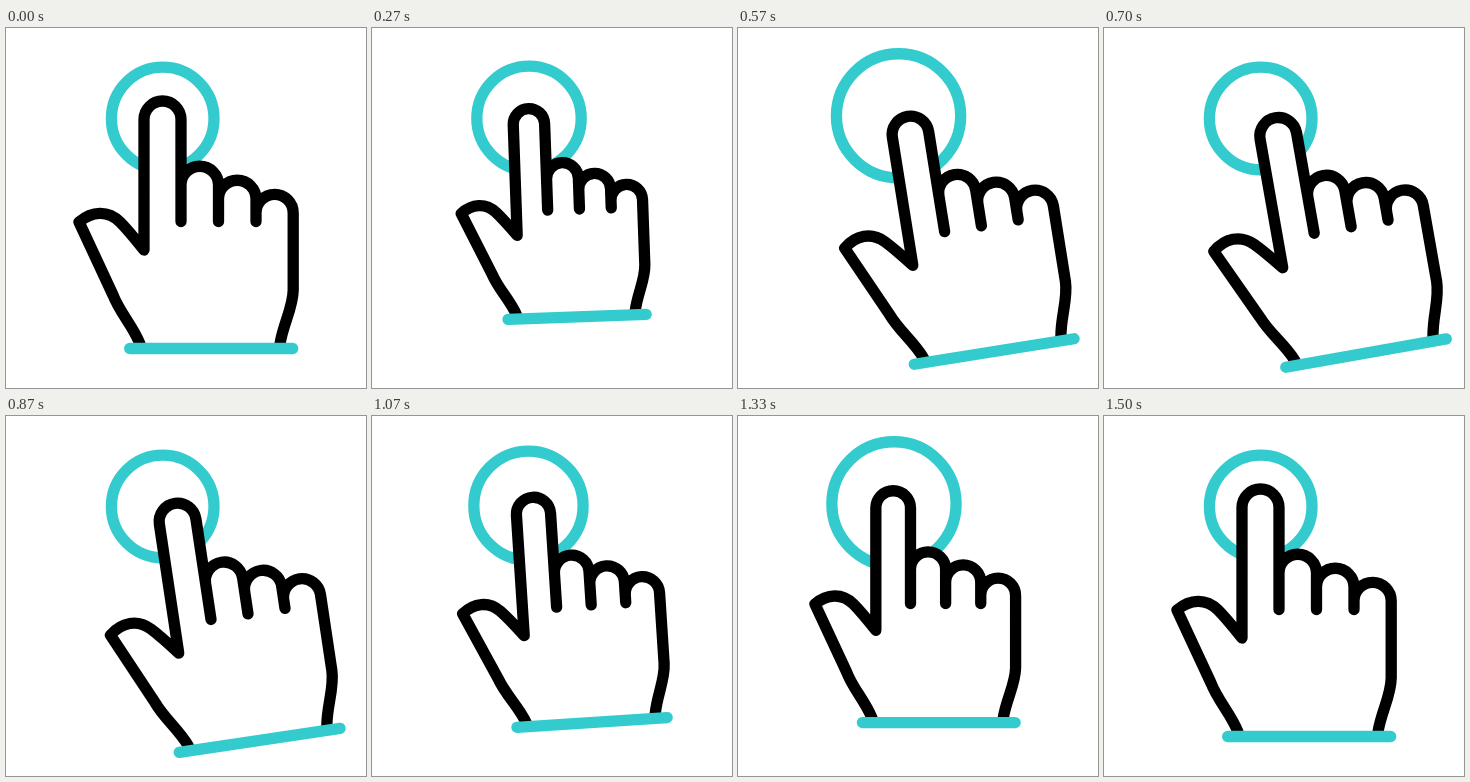
These frames come from a looping animation (360 px wide and 360 px high, 1.67 s). An HTML page:

```html
<!DOCTYPE html>
<html lang="en">
<head>
<meta charset="utf-8">
<title>Double tap</title>
<style>
  html, body { margin: 0; width: 100%; height: 100%; overflow: hidden; background: #fff; }
  svg { display: block; width: 100vw; height: 100vh; }
  path, circle { stroke-width: 11.3; stroke-linecap: round; stroke-linejoin: round; vector-effect: non-scaling-stroke; }
  .accent { fill: none; stroke: #33cbcd; }
  .skin { fill: #fff; stroke: #000; }
</style>
</head>
<body>
<svg viewBox="0 0 360 360">
  <circle id="ring" class="accent" cx="156.7" cy="90.5" r="51.3"/>
  <!-- the fingertip is the hand's local anchor -->
  <g id="hand">
    <g transform="translate(-156.5 -91.5)">
      <path class="skin" d="M134 316C127 298 114 285 107 267L73 194C86 183 102 182 114 194C122 202 130 212 138 222
        V91.5a18.5 18.5 0 0 1 37 0V157a18.75 18.75 0 0 1 37.5 0V171a18.75 18.75 0 0 1 37.5 0
        V185a18.6 18.6 0 0 1 37.2 0V262C287 280 277 296 274 316
        M175 157V193.5M212.5 171V193.5M250 185V193.5"/>
      <path class="accent" d="M123.7 320.5H286.7"/>
    </g>
  </g>
</svg>
<script>
  const LOOP = 1670, FPS = 30;
  const ring = document.getElementById('ring');
  const hand = document.getElementById('hand');

  const ease = (a, b, f) => {
    const t = Math.min(1, Math.max(0, (f - a) / (b - a)));
    return (1 - Math.cos(Math.PI * t)) / 2;
  };
  // rises from a to b, falls from c to d
  const pulse = (f, a, b, c, d) => ease(a, b, f) - ease(c, d, f);

  function draw(f) {
    const swing = pulse(f, 2.7, 20.5, 21.5, 39.5);
    const shrink = 0.178 * pulse(f, 2, 10, 10, 18) + 0.108 * pulse(f, 25, 36, 36, 45);
    const x = 156.5 + 17.8 * swing - 21 * shrink;
    const y = 91.5 + 16.5 * swing + 9 * shrink;
    hand.setAttribute('transform',
      `translate(${x} ${y}) rotate(${-10 * swing}) scale(${1 - shrink})`);

    const first = pulse(f, 7, 14, 14, 21);
    const second = pulse(f, 30, 37, 37, 44);
    const grow = first + second;
    ring.setAttribute('cx', 156.7 + 6.3 * first - 1.2 * second);
    ring.setAttribute('cy', 90.5 - 4.3 * grow);
    ring.setAttribute('r', 51.3 + 17.7 * grow);
  }

  function tick() {
    const ms = performance.now() % LOOP;
    draw(Math.floor((ms + 3.4) * FPS / 1000));
    requestAnimationFrame(tick);
  }
  tick();
</script>
</body>
</html>
```
